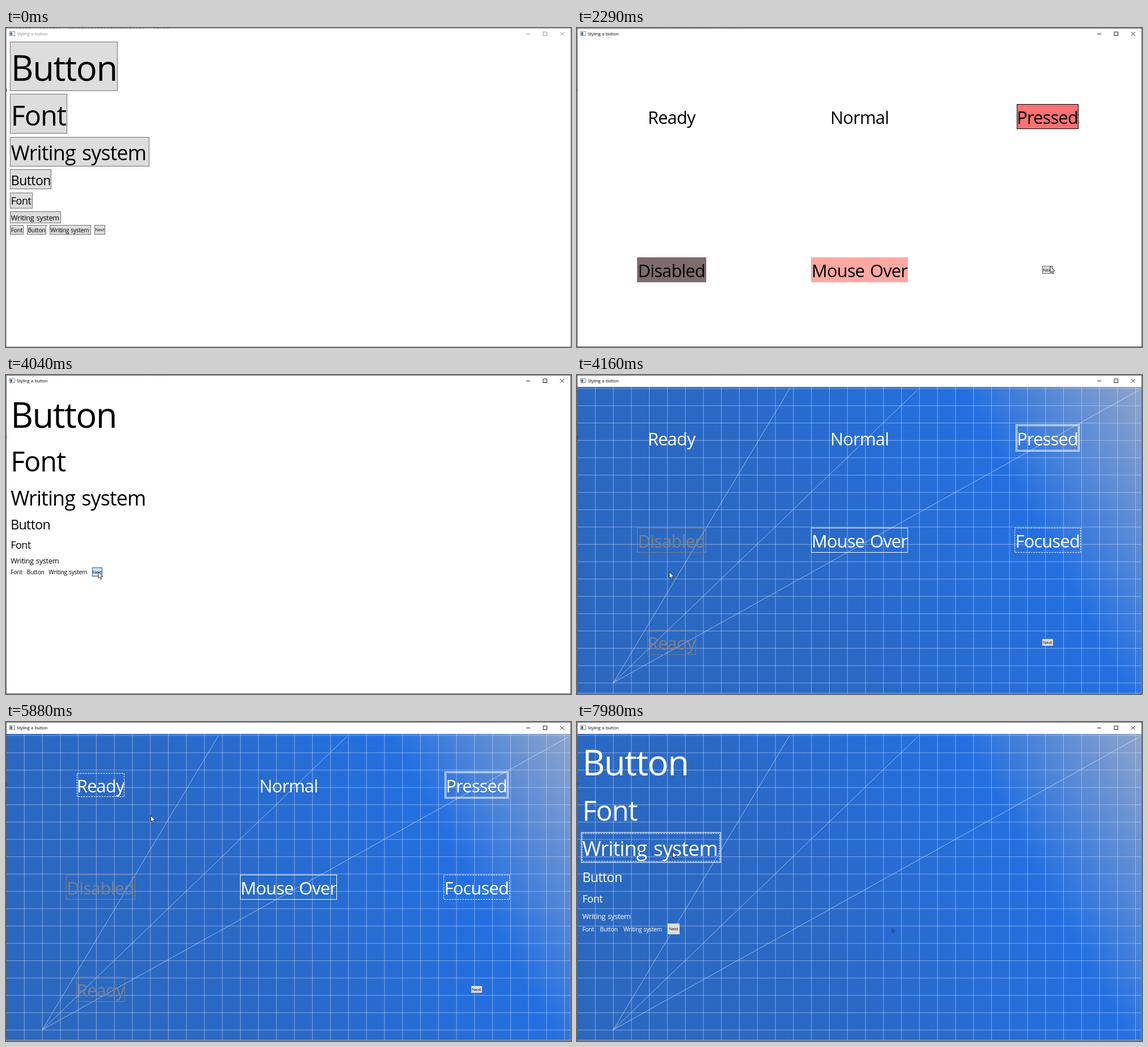
Animation of 997 by 562 pixels, one loop 8 s. Source, as an HTML page:

```html
<!DOCTYPE html>
<html lang="en">
<head>
<meta charset="utf-8">
<title>Styling a button</title>
<style>
  html, body { margin: 0; width: 100%; height: 100%; overflow: hidden; background: #fff; }
  svg { display: block; width: 997px; height: 562px; }
  text { font-family: "Open Sans", "Noto Sans", sans-serif; letter-spacing: -.024em; word-spacing: .08em; white-space: pre; }
</style>
</head>
<body>
<svg id="stage" viewBox="0 0 997 562" xmlns="http://www.w3.org/2000/svg"></svg>
<script>
const LOOP = 8000;
const ZOOM = .65;          // window pixels to stage pixels
const GAP = 10 * ZOOM;
const LINE = 1.34, ASCENT = 1.09;
const DASH = 'stroke-dasharray="3 1.6"';
// button widths in em
const WIDTH = { Button: 2.98, Font: 1.98, 'Writing system': 6.65, Next: 2.05,
  Ready: 2.66, Pressed: 3.4, Disabled: 3.82, 'Mouse Over': 5.4, Focused: 3.65 };

const stage = document.getElementById('stage');
const el = id => document.getElementById(id);
const group = (id, body) => `<g id="${id}">${body}</g>`;
const snap = v => Math.round(v - .5) + .5;

const text = (s, x, y, size, fill = '#000', anchor = 'start') =>
  `<text x="${x}" y="${y}" font-size="${size * .985}" fill="${fill}" text-anchor="${anchor}">${s}</text>`;

// box: [left, top, width, height]; grow moves every edge outwards
function rect(box, fill, stroke = 'none', grow = 0, extra = '') {
  const x0 = snap(box[0] - grow), y0 = snap(box[1] - grow);
  const x1 = snap(box[0] + box[2] + grow), y1 = snap(box[1] + box[3] + grow);
  return `<rect x="${x0}" y="${y0}" width="${x1 - x0}" height="${y1 - y0}" fill="${fill}" stroke="${stroke}" ${extra}/>`;
}
const frame = (box, grow = 0, extra = '') => rect(box, 'none', '#fff', grow, extra);

function nextButton(page, box, stroke) {
  page.next = box;
  page.idle = stroke;
  return group('next' + page.id, rect(box, '#ddd', stroke) +
    text('Next', box[0] + box[2] / 2, box[1] + box[3] / 2 + 2.9, 8, '#111', 'middle'));
}

// ---- page kinds -----------------------------------------------------
const SIZES = [96, 76, 56, 36, 28, 20];
const WORDS = ['Button', 'Font', 'Writing system'];
const ROW = ['Font', 'Button', 'Writing system'];

// A column of buttons, a row below it, and the Next button at its end
function listPage(page, pad, ink, fill, stroke, nextStroke) {
  let out = '', y = 24;
  const button = (word, x, size) => {
    const box = [x, y, WIDTH[word] * size + 2 * pad, LINE * size + 2 * pad];
    out += rect(box, fill, stroke) + text(word, x + pad, y + pad + ASCENT * size, size, ink);
    return box;
  };
  page.boxes = SIZES.map((size, i) => {
    const box = button(WORDS[i % 3], 7.5, size * ZOOM);
    y += box[3] + GAP;
    return box;
  });
  y -= GAP / 2;
  let x = 7.5, height;
  for (const word of ROW) {
    const box = button(word, x, 16 * ZOOM);
    x += box[2] + GAP;
    height = box[3];
  }
  return out + nextButton(page, [x + .6, y, WIDTH.Next * 12 * ZOOM + 2 * pad, height], nextStroke);
}

// Three columns of equal cells
const BIG = 48 * ZOOM;
const cell = (col, row, rows) => [1 + (col + .5) * 331.7, 21 + (row + .5) * 540 / rows];

function wordBox(word, [cx, cy]) {
  const w = WIDTH[word] * BIG + 2, h = 43.5;
  return [cx - w / 2, cy - h / 2, w, h];
}
const label = (word, [cx, cy], ink) => text(word, cx, cy + 12.5, BIG, ink, 'middle');
const cellNext = (page, [cx, cy], h, stroke) => nextButton(page, [cx - 9, cy - h / 2, 18, h], stroke);

function redPage(page) {
  const at = (col, row) => cell(col, row, 2);
  const filled = (word, c, fill, stroke) => rect(wordBox(word, c), fill, stroke) + label(word, c);
  return label('Ready', at(0, 0)) + label('Normal', at(1, 0)) +
    filled('Pressed', at(2, 0), '#f87272', '#000') +
    filled('Disabled', at(0, 1), '#7e6b6c', '#7e6b6c') +
    filled('Mouse Over', at(1, 1), '#ffa8a2', '#ffa8a2') +
    cellNext(page, at(2, 1), 13, '#707070');
}

function bluePage(page) {
  const at = (col, row) => cell(col, row, 3);
  const dim = '#7b808c';
  const boxed = (word, c, ink, grow = 0, extra = '') =>
    rect(wordBox(word, c), 'none', ink, grow, extra) + label(word, c, ink);
  const ready = page.ready = wordBox('Ready', at(0, 0));
  return label('Ready', at(0, 0), '#fff') + label('Normal', at(1, 0), '#fff') +
    boxed('Pressed', at(2, 0), '#fff') + frame(wordBox('Pressed', at(2, 0)), 2) +
    boxed('Disabled', at(0, 1), dim) + boxed('Mouse Over', at(1, 1), '#fff') +
    boxed('Focused', at(2, 1), '#fff', 0, DASH) + boxed('Ready', at(0, 2), dim) +
    group('readyFocus', frame(ready, -1, DASH)) +
    group('readyHover', frame(ready)) + group('readyPress', frame(ready, 2)) +
    cellNext(page, at(2, 2), 11.5, '#ddd');
}

function whitePage(page) {
  const list = listPage(page, 2, '#fff', 'none', 'none', '#ddd');
  const box = page.boxes[2];
  return list + group('writeHover', frame(box, -1)) +
    group('writePress', frame(box) + frame(box, -2, DASH));
}

const PAGES = [
  { id: 'A', start: 0, build: p => listPage(p, 1.3, '#000', '#ddd', '#707070', '#707070') },
  { id: 'B', start: 1320, build: redPage },
  { id: 'C', start: 2510, build: p => listPage(p, .65, '#000', 'none', 'none', '#707070') },
  { id: 'D', start: 4160, build: bluePage },
  { id: 'E', start: 7210, build: whitePage }
];

function blueprint() {
  let d = 'M1 23.8H996M1 560.5H996M996 24V561';
  for (let i = 0; i < 17; i++) d += `M1 ${(54.2 + i * 30.53).toFixed(1)}H996`;
  for (let i = 0; i < 31; i++) d += `M${(32.3 + i * 31.78).toFixed(1)} 21V561`;
  return '<path d="M1 21H996V561H1Z" fill="url(#blue)"/>' +
    `<path d="${d}" fill="none" stroke="#dfe9fa" stroke-opacity=".55" stroke-width=".9"/>` +
    '<path d="M375 24L64.3 542L601 26M64.3 542L992 26.5" fill="none" stroke="#fff" stroke-opacity=".65" stroke-width=".8"/>';
}

const ARROW = 'M0 0V11.2L2.6 8.8L4.4 13L6.2 12.2L4.4 8.2H8Z';

stage.innerHTML = `
  <defs><linearGradient id="blue" gradientUnits="userSpaceOnUse" x1="1" y1="561" x2="996" y2="21">
    <stop offset="0" stop-color="#2c68be"/><stop offset=".4" stop-color="#2a69c6"/>
    <stop offset=".755" stop-color="#2470e1"/><stop offset="1" stop-color="#8ea4cb"/>
  </linearGradient></defs>
  <rect width="997" height="562" fill="#fff"/>
  ${group('grid', blueprint())}
  ${PAGES.map(p => group('page' + p.id, p.build(p))).join('')}
  <rect id="edge" x=".5" y=".5" width="996" height="561" fill="none"/>
  <path d="M0 .5H45M60 .5H96M110 .5H245M261 .5H287" stroke="#555" stroke-dasharray="3 2 5 2 2 3" opacity=".7"/>
  <path d="M.5 107V112" stroke="#333"/>
  <rect x="6.5" y="6" width="9" height="7.5" fill="#fff" stroke="#8a8f96"/>
  <rect x="7.5" y="7.5" width="3.5" height="5" fill="#4b6a8c"/>
  <g id="caption">
    ${text('Styling a button', 19.3, 12.9, 12 * ZOOM)}
    <path d="M918 10.5H925M948 7H954.5V13.5H948ZM978 7L984.7 13.7M984.7 7L978 13.7" fill="none" stroke="#000" stroke-width=".9"/>
  </g>
  <path id="ghost" d="${ARROW}" transform="translate(555 361.5)" fill="#1c4582" opacity=".55"/>
  <path id="cursor" d="${ARROW}" fill="#fff" stroke="#000" stroke-width=".8" stroke-linejoin="round"/>`;

// ---- motion ---------------------------------------------------------
// Hand moves: start, end, target x and y, sideways bend
const MOVES = [
  [60, 800, 171, 351, 0],
  [1490, 2320, 835, 420, -50],
  [2530, 3160, 241, 321, 0],
  [3190, 3740, 163, 347, 0],
  [4360, 5070, 190, 112, 0],
  [5390, 6160, 258, 167, 0],
  [6230, 7020, 829, 468, 85],
  [7210, 7830, 168.5, 228, 0]
];
const HOME = [439, 525];
const ease = u => 1 - (1 - u ** 1.3) ** 4;

function pointer(t) {
  let [x, y] = HOME, rest = true;
  for (const [t0, t1, tx, ty, bend] of MOVES) {
    if (t < t0) break;
    const e = ease(Math.min(1, (t - t0) / (t1 - t0)));
    const dx = tx - x, dy = ty - y;
    const side = bend * Math.sin(Math.PI * e) / Math.hypot(dx, dy);
    x += dx * e - dy * side;
    y += dy * e + dx * side;
    rest = t >= t1;
  }
  return { x, y, rest };
}

const show = (id, on) => el(id).setAttribute('visibility', on ? 'inherit' : 'hidden');
const over = (p, [x, y, w, h]) => p.rest && p.x >= x && p.x <= x + w && p.y >= y && p.y <= y + h;

function paintNext(page, hover, down) {
  const box = el('next' + page.id).firstElementChild;
  box.setAttribute('fill', down ? '#c4e5f6' : hover ? '#bee6fd' : '#ddd');
  box.setAttribute('stroke', down ? '#2c628b' : hover ? '#3c7fb1' : page.idle);
}

const CLICK = 130;         // press before the page turns
const [, , , states, writing] = PAGES;

function draw(t) {
  const tip = pointer(t);
  PAGES.forEach((page, i) => {
    const end = i + 1 < PAGES.length ? PAGES[i + 1].start : Infinity;
    show('page' + page.id, t >= page.start && t < end);
    paintNext(page, over(tip, page.next), t >= end - CLICK);
  });
  show('grid', t >= states.start);

  const active = t >= PAGES[1].start - CLICK;
  el('edge').setAttribute('stroke', active ? '#666' : '#aaa');
  el('caption').setAttribute('opacity', active ? 1 : .45);

  show('readyHover', over(tip, states.ready));
  show('readyPress', t >= 5200 && t < 5280);
  show('readyFocus', t >= 5200);

  const down = t >= 7930;
  show('writeHover', !down && over(tip, writing.boxes[2]));
  show('writePress', down);

  show('ghost', t >= 7440);
  show('cursor', t >= 80);
  el('cursor').setAttribute('transform', `translate(${tip.x.toFixed(2)} ${tip.y.toFixed(2)})`);
}

function tick() {
  draw(performance.now() % LOOP);
  requestAnimationFrame(tick);
}
tick();
</script>
</body>
</html>
```
